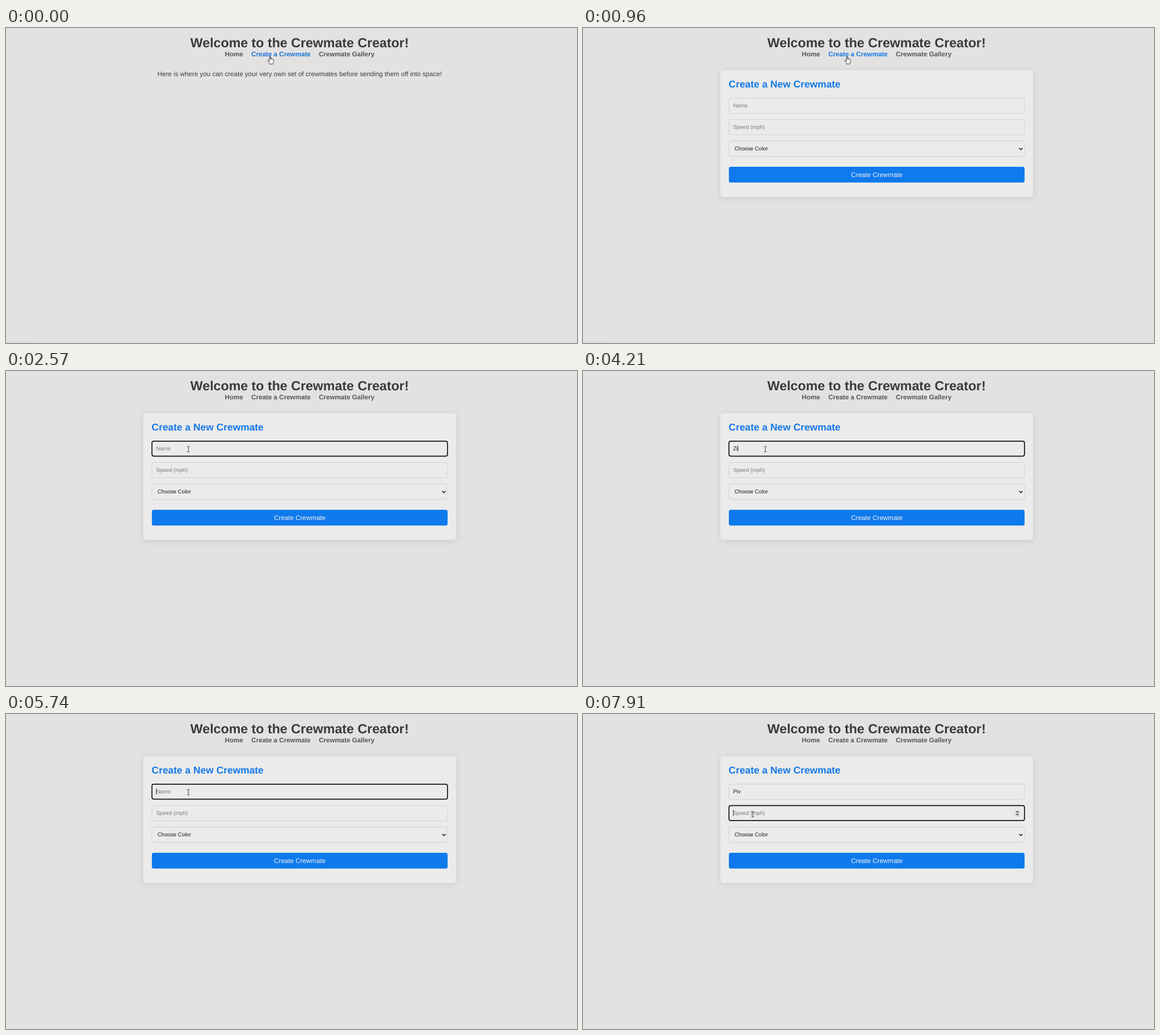
Write an HTML page that moves like this. It is 1006x556 px and loops after 8000 ms.

```html
<!DOCTYPE html>
<html lang="en">
<head>
<meta charset="utf-8">
<title>Crewmate Creator</title>
<style>
html, body { margin: 0; width: 100%; height: 100%; overflow: hidden; background: #e2e2e2; }
svg { display: block; width: 1006px; height: 556px; }
text {
  font-family: "Liberation Sans", Arial, sans-serif;
  font-size: 9.67px; fill: #1a1a1a;
  text-rendering: geometricPrecision; white-space: pre;
}
.h1 { font-size: 23.2px; font-weight: bold; fill: #3a3a3a; text-anchor: middle; }
.h2 { font-size: 17.4px; font-weight: bold; fill: #1478e6; }
.nav { font-size: 11.6px; font-weight: bold; fill: #555; }
.body { font-size: 11.6px; fill: #3c3c3c; text-anchor: middle; }
.hint { fill: #7b7b7b; }
.card { fill: #ebebeb; filter: drop-shadow(0 2.9px 5.8px rgba(0,0,0,.1)); }
.field { fill: #ebebeb; stroke: #d0d0d0; stroke-width: .9; }
.focus { fill: none; stroke: #151518; stroke-width: 1.7; }
.button { fill: #0f7aec; }
.caret { fill: #222; }
.cursor path { stroke-linejoin: round; stroke-linecap: round; }
</style>
</head>
<body>
<svg viewBox="0 0 1006 556">
  <rect id="status" y="554.6" width="52" height="1.4" fill="#d8d8d8"/>
  <text class="h1" x="517.2" y="34.3">Welcome to the Crewmate Creator!</text>
  <text class="nav" x="385.6" y="50">Home</text>
  <text class="nav" x="432.3" y="50" id="link">Create a Crewmate</text>
  <text class="nav" x="551.2" y="50">Crewmate Gallery</text>

  <text class="body" id="intro" x="517.4" y="85.2">Here is where you can create your very own set of crewmates before sending them off into space!</text>

  <g id="form">
    <rect class="card" x="242" y="74.6" width="551" height="223.6" rx="5.8"/>
    <text class="h2" x="256.6" y="104.9">Create a New Crewmate</text>

    <rect class="field" x="257" y="123.6" width="521" height="27" rx="3.4"/>
    <rect class="field" x="257" y="161.4" width="521" height="27" rx="3.4"/>
    <rect class="field" x="257" y="199.3" width="521" height="27.6" rx="3.4"/>
    <rect class="focus" id="ring" x="257.2" width="520.6" height="26.4" rx="3.2"/>

    <text class="hint" id="nameHint" x="264.4" y="139.6">Name</text>
    <text id="name" x="264.4" y="139.6"></text>
    <text class="hint" x="264.4" y="177.9">Speed (mph)</text>
    <text x="266.9" y="216.4">Choose Color</text>
    <path d="M768.5 211.9l2.9 2.9 2.9-2.9" fill="none" stroke="#1a1a1a" stroke-width="1.5"/>

    <g id="spinner">
      <rect x="760" y="169" width="10.6" height="12" rx="1" fill="#dfdfdf"/>
      <path d="M762.4 173.8h5.8l-2.9-3zM762.4 176.3h5.8l-2.9 3z" fill="#4a4a4a"/>
    </g>

    <rect class="button" x="257" y="245" width="521" height="27.8" rx="3.4"/>
    <text x="517.6" y="263" style="font-size:11.6px;fill:#f2f2f2;text-anchor:middle">Create Crewmate</text>
    <rect class="caret" id="caret" width=".9" height="11"/>
  </g>

  <g class="cursor" id="hand">
    <path d="M-.9 .9Q0-.5 .9 .9V5.2Q2-.0 2.8 5.5Q4.2 4.6 4.6 6Q6.4 5.2 6.5 7.2V10Q6.3 11.6 5.3 12.6V14H-.6V12.9L-3.8 8.7Q-4.3 7-2.7 7.1L-.9 8.7Z" fill="#f4f4f4" stroke="#333" stroke-width=".9"/>
  </g>
  <g class="cursor" id="arrow">
    <path d="M0 0V11.6L2.7 9.1 4.5 13.2 6.3 12.4 4.5 8.4H8.2Z" fill="#f8f8f8" stroke="#333" stroke-width=".7"/>
  </g>
  <g class="cursor" id="beam">
    <path d="M-1.9-4.8H-.6L0-4.3 .6-4.8H1.9M0-4.3V4.3M-1.9 4.8H-.6L0 4.3 .6 4.8H1.9" fill="none" stroke="#333" stroke-width=".9"/>
  </g>
</svg>
<script>
const LOOP = 8000, BLINK = 530;
const FORM_AT = 960, NAME_FOCUS = 2020, SPEED_FOCUS = 7800;
const typing = [
  [NAME_FOCUS, ''], [3640, 'Z'], [4010, 'Zi'], [5000, 'Z'], [5300, ''],
  [6150, 'P'], [6350, 'Pi'], [6560, 'Piv']
];
const moves = [
  { from: 1300, to: 1900, a: [465, 49.6], b: [321.3, 138] },
  { from: 7380, to: 7740, a: [321.3, 138], b: [299, 177] }
];
const el = id => document.getElementById(id);
const show = (id, on) => el(id).setAttribute('visibility', on ? 'visible' : 'hidden');
const clamp = v => Math.min(1, Math.max(0, v));
const ease = p => p * p * (3 - 2 * p);
const mix = (a, b, p) => a + (b - a) * p;

function pointer(t) {
  const m = t < moves[1].from ? moves[0] : moves[1];
  const p = ease(clamp((t - m.from) / (m.to - m.from)));
  return [mix(m.a[0], m.b[0], p), mix(m.a[1], m.b[1], p)];
}

function draw(t) {
  const [x, y] = pointer(t);
  const onLink = y < 53;
  const onName = y > 123.5 && y < 151, onSpeed = y > 161;
  const kind = onLink ? 'hand' : onName || onSpeed ? 'beam' : 'arrow';
  for (const id of ['hand', 'arrow', 'beam']) show(id, id === kind);
  el(kind).setAttribute('transform', `translate(${x} ${y})`);

  const p = clamp(t / 130);
  el('link').style.fill = onLink
    ? `rgb(${mix(26, 20, p)},${mix(115, 120, p)},${mix(216, 230, p)})` : '';
  show('status', onLink);
  show('intro', t < FORM_AT);
  el('form').style.display = t < FORM_AT ? 'none' : '';

  const inSpeed = t >= SPEED_FOCUS, focused = t >= NAME_FOCUS;
  const [since, value] = typing.findLast(k => t >= k[0]) || [0, ''];
  el('name').textContent = value;
  show('nameHint', !value);
  show('ring', focused);
  el('ring').setAttribute('y', inSpeed ? 161.7 : 123.9);
  show('spinner', onSpeed || inSpeed);

  const idle = t - (inSpeed ? SPEED_FOCUS : since);
  show('caret', focused && idle % (2 * BLINK) < BLINK);
  const w = value && !inSpeed ? el('name').getComputedTextLength() : 0;
  el('caret').setAttribute('x', 264.5 + w);
  el('caret').setAttribute('y', inSpeed ? 169.2 : 131.2);
}

const start = performance.now();
function tick() {
  draw((performance.now() - start) % LOOP);
  requestAnimationFrame(tick);
}
tick();
</script>
</body>
</html>
```
